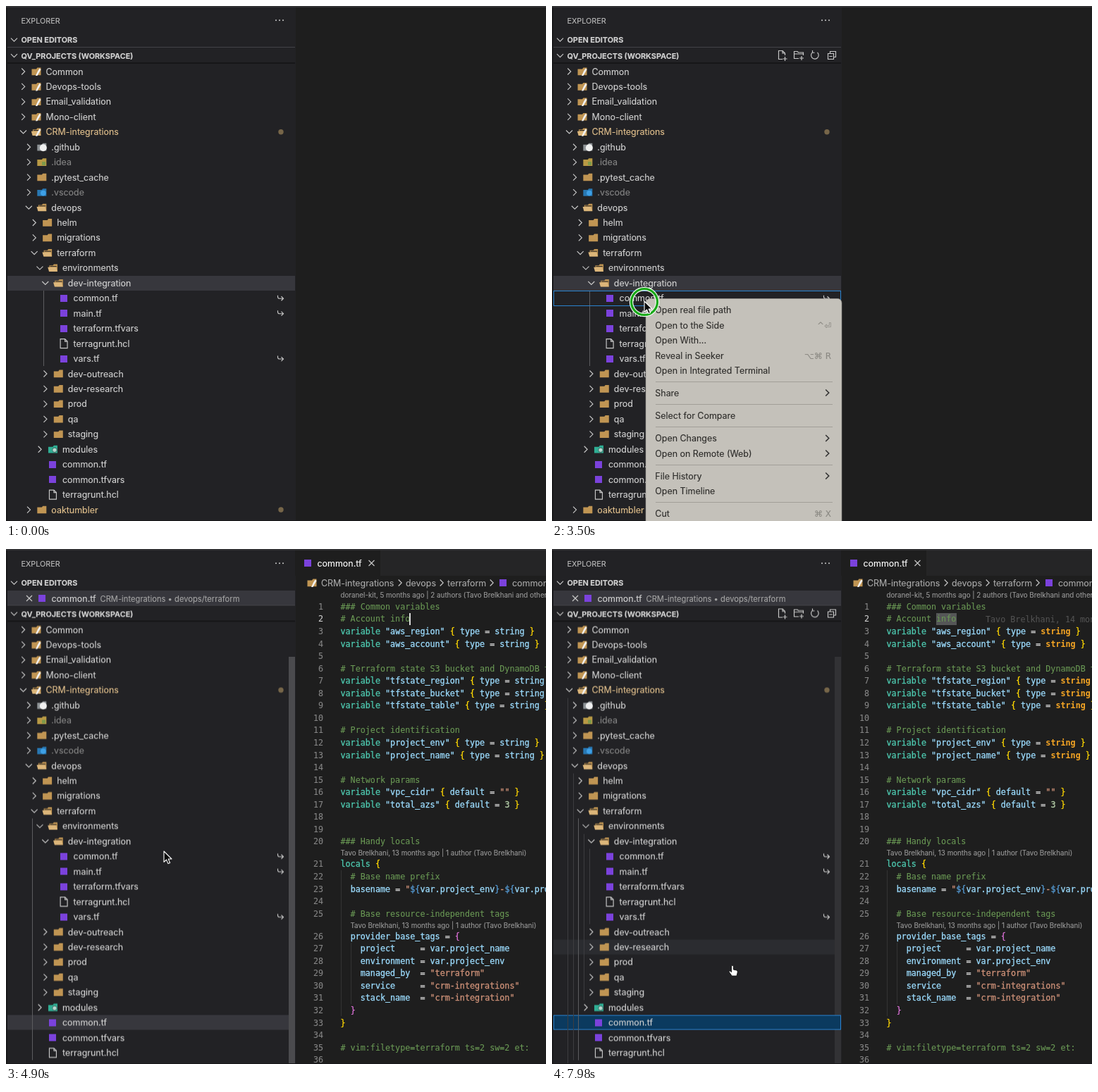
These frames come from a looping animation (766 px wide and 731 px high, 8 s). An HTML page:

```html
<!DOCTYPE html>
<html lang="en">
<head>
<meta charset="utf-8">
<title>Open real file path</title>
<style>
html, body { margin: 0; width: 100%; height: 100%; overflow: hidden; background: #1e1e1e; }
svg { display: block; width: 100%; height: 100%; }
rect { shape-rendering: crispEdges; }
rect[rx] { shape-rendering: auto; }
text {
  font: 12.45px Inter, sans-serif; white-space: pre;
  color: #d2d2d2; fill: currentColor; stroke: currentColor; stroke-width: .12;
}
.head { font-size: 10.85px; font-weight: 700; }
.lens { font-size: 9.8px; color: #999; }
.mono { font: 11.73px "DejaVu Sans Mono", monospace; color: #d4d4d4; stroke-width: .3; }
.num { color: #858585; text-anchor: end; stroke-width: .1; }
.comment { color: #6a9955; stroke-width: .1; }
.kw { color: #4ec9b0; }
.name { color: #9cdcfe; }
.str { color: #ce9178; }
.interp { color: #569cd6; }
.brace { color: #ffd700; }
.inner { color: #da70d6; }
.digit { color: #b5cea8; }
.line { fill: none; stroke: #c8c8c8; stroke-width: 1.15; }
#menu text { color: #2d2c2a; }
#menu .keys { font: 12px "DejaVu Sans", sans-serif; color: #8b8983; text-anchor: end; }
#menu .line { stroke: #333; stroke-width: 1.6; }
#menu #pick text { color: #fff; }
</style>
</head>
<body>
<svg viewBox="0 0 766 731" id="stage"></svg>
<script>
const LOOP = 8000, ROW = 21.45, OPENED = 4760;
const AUTHOR = 'Tavo Brelkhani';
const css = [];

// frames: [ms, declarations]
function animate(selector, timing, frames) {
  const name = 'k' + css.length;
  const body = frames.map(([ms, rule]) => `${ms / LOOP * 100}%{${rule}}`).join('');
  css.push(`@keyframes ${name}{${body}}${selector}{animation:${name} ${LOOP}ms ${timing} infinite}`);
}
function showDuring(selector, ...spans) {
  const frames = [[0, 'opacity:0']];
  for (const [start, end] of spans) {
    frames.push([start, 'opacity:1']);
    if (end < LOOP) frames.push([end, 'opacity:0']);
  }
  animate(selector, 'step-end', frames);
}

const esc = s => s.replace(/&/g, '&amp;').replace(/</g, '&lt;');
const text = (x, y, s, attrs = '') => `<text x="${x}" y="${y + 4.5}" ${attrs}>${esc(s)}</text>`;
const rect = (x, y, w, h, fill, attrs = '') =>
  `<rect x="${x}" y="${y}" width="${w}" height="${h}" fill="${fill}" ${attrs}/>`;
const path = (d, attrs = 'class="line"') => `<path d="${d}" ${attrs}/>`;
const at = (x, y, body, attrs = '') => `<g transform="translate(${x} ${y})" ${attrs}>${body}</g>`;

const right = path('M-2.3-4.5 2.2 0-2.3 4.5');
const down = path('M-4.5-2.3 0 2.2 4.5-2.3');
const cross = path('M-4-4 4 4M4-4-4 4');
const linkArrow = path('M-4-4v2q0 2.5 2.5 2.5H4M1-2.5 4 .5 1 3.5');

const closed = color => path('M-6.5 5.2V-3.6H0l1.4-1.8h5.1V5.2z', `fill="${color}"`);
const opened = path('M-5 5V-3.6H0l1.4-1.8h5.1V5z', 'fill="#c09553"') +
  path('M-7.2-1H4.6L6.5 5.2H-5.4z', 'fill="#dcb67a"') + path('M-4-2.2H5.4', 'stroke="#222225"');
const slash = path('M4.6-4.6 6.6-3 1.4 6-1 6 2-.5z', 'fill="#f2f2f2"');
const square = rect(-5, -5, 10, 10, '#7b42dc');
const icons = {
  root: closed('#c09553') + slash,
  rootOpen: opened + slash,
  folder: closed('#c09553'),
  open: opened,
  git: closed('#8e9396') + '<circle cx="2" cy="1" r="5" fill="#f0f0f0"/>',
  idea: closed('#b99a45') + rect(0, -1, 5, 5, '#7f9a4a'),
  code: closed('#2878b4') + '<circle cx="2" cy="1" r="3.8" fill="#3ea0e6"/>',
  mod: closed('#2fae94') + '<circle cx="2.5" cy="1" r="3.2" fill="#b8d8d0" stroke="#356a60"/>',
  tf: square,
  page: path('M-5-6.5H1.5L5-3V6.5H-5zM1.5-6.5V-3H5'),
};

const entries = `0 root Common
0 root Devops-tools
0 root Email_validation
0 root Mono-client
0 rootOpen CRM-integrations dot
1 git .github
1 idea .idea
1 folder .pytest_cache
1 code .vscode
1 open devops
2 folder helm
2 folder migrations
2 open terraform
3 open environments
4 open dev-integration
5 tf common.tf link
5 tf main.tf link
5 tf terraform.tfvars
5 page terragrunt.hcl
5 tf vars.tf link
4 folder dev-outreach
4 folder dev-research
4 folder prod
4 folder qa
4 folder staging
3 mod modules
3 tf common.tf
3 tf common.tfvars
3 page terragrunt.hcl
1 folder oaktumbler dot
1 folder scripts`.split('\n').map(line => line.split(' '));

const rowTop = i => 82.3 + i * ROW;
const bar = (i, fill, attrs) => rect(2, rowTop(i), 408, ROW, fill, attrs);
const outline = (i, fill, id) =>
  rect(2.5, rowTop(i), 407, ROW - .5, fill, `id="${id}" stroke="#2a83d0"`);
const guide = (depth, first, last, color, attrs = '') =>
  rect(21.8 + depth * 7.82, rowTop(first), 1, (last - first + 1) * ROW, color, attrs);

function treeRow([depth, kind, name, mark], i) {
  const x = 56.5 + depth * 7.82, y = 93 + i * ROW;
  const color = mark === 'dot' ? '#e2c08d' : kind === 'idea' || kind === 'code' ? '#858585' : '#d2d2d2';
  const leaf = kind === 'tf' || kind === 'page';
  const chevron = leaf ? '' : at(x - 32, y, /open/i.test(kind) ? down : right);
  const badge = mark === 'dot' ? `<circle cx="390" cy="${y}" r="3.7" fill="#776649"/>`
    : mark ? at(389.5, y, linkArrow) : '';
  return chevron + at(x - 13.5, y, icons[kind]) + text(x, y, name, `style="color:${color}"`) + badge;
}

function tree() {
  const tools = at(327, 70, path('M0 5.5H-5.5V-6.5H0L3.5-3V0M0-6.5V-3H3.5M3.5 2V8M.5 5H6.5')) +
    at(350, 70, path('M0 4.5H-6.5V-5.5H-2L-.5-4H6.5V0M-6.5-2H6.5M4 1V7M1 4H7')) +
    at(373, 70, path('M3.5-4A5.3 5.3 0 1 1-3-4.6M-3.5-7V-3.8H-.5')) +
    at(397, 70, path('M-2.5-2.5V-5.5H5.5V2.5H2.5M-5.5-2.5H2.5V5.5H-5.5zM-3.7 1.5H.7'));
  const guides = guide(0, 5, 30, '#3d3d40') + guide(1, 10, 28, '#3d3d40') +
    guide(2, 13, 28, '#3d3d40') + guide(3, 14, 24, '#3d3d40') + guide(4, 15, 19, '#3d3d40');
  return `<g id="tree">
    ${rect(2, 58, 408, 1, '#434347')}
    ${at(11.5, 70.5, down)}${text(21.5, 70, 'QV_PROJECTS (WORKSPACE)', 'class="head"')}
    <g id="tools">${tools}</g>
    ${bar(14, '#37373d', 'id="dirRow"')}
    ${bar(26, '#37373d', 'id="fileRow"')}
    ${bar(21, '#2b2c30', 'id="hoverRow"')}
    ${rect(400.5, 132, 9.5, 620, '#4b4b4e', 'id="thumb"')}
    ${rect(400.5, 132, 9.5, 620, '#323235', 'id="thumbDim"')}
    ${outline(26, '#0b3a5f', 'focusRow')}
    <g id="guides">${guides}</g>
    ${guide(4, 15, 19, '#5c5c5f', 'id="dirGuide"')}${guide(2, 13, 28, '#5c5c5f', 'id="fileGuide"')}
    ${entries.map(treeRow).join('')}
    ${outline(15, 'none', 'menuRow')}
    ${rect(2, 80.3, 408, 2, '#161618')}
  </g>`;
}

const source = `### Common variables
# Account info
variable "aws_region" { type = string }
variable "aws_account" { type = string }

# Terraform state S3 bucket and DynamoDB table
variable "tfstate_region" { type = string }
variable "tfstate_bucket" { type = string }
variable "tfstate_table" { type = string }

# Project identification
variable "project_env" { type = string }
variable "project_name" { type = string }

# Network params
variable "vpc_cidr" { default = "" }
variable "total_azs" { default = 3 }


### Handy locals
locals {
  # Base name prefix
  basename = "\${var.project_env}-\${var.project_name}"

  # Base resource-independent tags
  provider_base_tags = {
    project     = var.project_name
    environment = var.project_env
    managed_by  = "terraform"
    service     = "crm-integrations"
    stack_name  = "crm-integration"
  }
}

# vim:filetype=terraform ts=2 sw=2 et:
`.split('\n');

const span = (cls, s) => `<tspan class="${cls}">${s}</tspan>`;
function highlight(line, number) {
  if (/^\s*#/.test(line)) return span('comment', line);
  const braces = number === 26 || number === 32 ? 'inner' : 'brace';
  return line.replace(/"[^"]*"|[{}]|[\w.]+/g, token => {
    if (/^"\w+"/.test(token) && line.startsWith('variable')) return span('name', token);
    if (token[0] === '"') return span('str', token.replace(/\$\{([^}]*)\}/g,
      (_, ref) => span('interp', '${') + span('name', ref) + span('interp', '}')));
    if (/[{}]/.test(token)) return span(braces, token);
    if (/^\d/.test(token)) return span('digit', token);
    if (token === 'string') return span('type', token);
    return span(/^(variable|locals)$/.test(token) ? 'kw' : 'name', token);
  });
}

const lineY = n => 81.6 + (n - 1) * 17.55 + (n > 20 ? 14.5 : 0) + (n > 25 ? 14.5 : 0);

function editor() {
  const code = source.map((line, i) => {
    const n = i + 1, y = lineY(n) + 4.3;
    return `<text class="mono num" x="450" y="${y}" ${n === 2 ? 'style="color:#d0d0d0"' : ''}>${n}</text>` +
      `<text class="mono" x="474.5" y="${y}">${highlight(line, n)}</text>`;
  }).join('');
  const lens = `${AUTHOR}, 13 months ago | 1 author (${AUTHOR})`;
  const dim = 'style="color:#a9a9a9"';
  return `<g id="editor">
    ${rect(410, 2, 356, 35.5, '#252526')}${rect(410, 2, 121, 36, '#1e1e1e')}
    ${at(428, 20, square)}${text(441.5, 20, 'common.tf', 'style="color:#fff"')}${at(518.5, 20, cross)}
    ${at(434, 48, icons.root)}${text(447, 48, 'CRM-integrations', dim)}${at(559, 48, right)}
    ${text(567, 48, 'devops', dim)}${at(618, 48, right)}${text(626, 48, 'terraform', dim)}
    ${at(689, 48, right)}${at(705, 48, square)}${text(718, 48, 'common.tf', dim)}
    ${text(474.5, 64.5, `doranel-kit, 5 months ago | 2 authors (${AUTHOR} and others)`, 'class="lens"')}
    ${text(474.5, 430.5, lens, 'class="lens"')}${text(488.5, 533, lens, 'class="lens"')}
    ${rect(474.5, 456, 1, 207, '#333')}${rect(488.5, 558.5, 1, 87.5, '#333')}
    <g id="blame">${rect(545, 90.5, 28.5, 17.5, '#555657')}
      ${text(615, 99, `${AUTHOR}, 14 months ago`, 'class="mono" style="color:#525252;stroke-width:.1"')}</g>
    ${code}
    ${rect(572.3, 90.5, 1.7, 17.5, '#d8d8d8', 'id="caret"')}
  </g>`;
}

function menu() {
  const items = [[431.5, 'Open real file path'], [453, 'Open to the Side', '^⏎'], [474.5, 'Open With...'],
    [496, 'Reveal in Seeker', '⌥⌘ R'], [517.5, 'Open in Integrated Terminal'], [549, 'Share', '>'],
    [581.5, 'Select for Compare'], [613.5, 'Open Changes', '>'], [635, 'Open on Remote (Web)', '>'],
    [667, 'File History', '>'], [688.5, 'Open Timeline'], [720.5, 'Cut', '⌘ X']];
  const rows = items.map(([y, label, extra]) => text(146.3, y, label) +
    (extra === '>' ? at(390.5, y, right) : extra ? text(396, y, extra, 'class="keys"') : '')).join('');
  const rules = [533, 565, 597.5, 651, 704.5].map(y => rect(146.5, y - .5, 251, 1, '#a19e98')).join('');
  return `<g id="menu">${rect(133, 415.3, 278, 340, '#c4c1ba', 'rx="6" stroke="#8a8883" stroke-width=".6"')}
    ${rules}${rows}
    <g id="pick">${rect(137, 421, 270, 21, '#1f72d2', 'rx="4"')}${text(146.3, 431.5, items[0][1])}</g></g>`;
}

const ring = (id, x, y) => `<g id="${id}" fill="none"><circle cx="${x}" cy="${y}" r="18.5" stroke="#f4fff4"
  stroke-width="5.5"/><circle cx="${x}" cy="${y}" r="18.5" stroke="#18a818" stroke-width="3.2"/></g>`;

const pointer = `<g id="pointer">
  ${path('M0 0V15.3L3.5 12 6 17.6 8.6 16.5 6.2 11H11z',
    'id="arrow" fill="#0a0a0a" stroke="#fff" stroke-width="1.1" stroke-linejoin="round"')}
  ${path('M-1.5 1Q0-1 1.4 1V6L6 7Q7.6 7.6 7.2 10L6 15H-.8L-5 9Q-6 7.5-3.4 8L-1.5 9.6z',
    'id="hand" fill="#fff" stroke="#111" stroke-width=".9" stroke-linejoin="round"')}
</g>`;

document.getElementById('stage').innerHTML = `
  ${rect(0, 0, 766, 731, '#1e1e1e')}${rect(0, 0, 410.5, 731, '#222225')}
  ${text(21.5, 20, 'EXPLORER', 'style="font-size:10.8px;color:#bbb"')}
  ${[383, 388, 393].map(x => `<circle cx="${x}" cy="20.3" r="1" fill="#ccc"/>`).join('')}
  ${at(11.5, 48, down)}${text(21.5, 47.5, 'OPEN EDITORS', 'class="head"')}
  <g id="openItem">${rect(2, 59, 408, ROW, '#37373d')}${at(33, 70, cross)}${at(51, 70, square)}
    ${text(64.5, 70, 'common.tf')}
    ${text(133.5, 70, 'CRM-integrations • devops/terraform', 'style="font-size:11.2px;color:#a2a2a2"')}</g>
  ${tree()}${editor()}
  ${rect(0, 0, 766, 2.3, '#343436')}${rect(0, 2, 1.5, 729, '#18181a')}${rect(0, 729.8, 766, 1.2, '#19191b')}
  ${menu()}
  ${ring('rightClick', 131, 420)}${ring('menuClick', 224, 430)}${ring('fileClick', 121, 675)}
  ${pointer}`;

animate('#tree', 'step-end', [[0, 'transform:none'], [OPENED, `transform:translateY(${ROW}px)`]]);
showDuring('#tools', [70, 210], [3500, OPENED], [6650, 7000], [7840, LOOP]);
showDuring('#dirRow', [0, OPENED]);
showDuring('#dirGuide', [0, OPENED]);
showDuring('#menuRow', [3500, OPENED]);
showDuring('#fileRow', [OPENED, 6650]);
showDuring('#fileGuide', [OPENED, LOOP]);
showDuring('#focusRow', [6650, LOOP]);
showDuring('#hoverRow', [7840, LOOP]);
showDuring('#openItem', [OPENED, LOOP]);
showDuring('#editor', [OPENED, LOOP]);
showDuring('#thumb', [3570, 5110]);
showDuring('#thumbDim', [5110, LOOP]);
showDuring('#blame', [5320, LOOP]);
showDuring('#caret', [4850, 5380], [5910, 6440]);
showDuring('#pick', [3850, OPENED]);
showDuring('#rightClick', [3500, 3640]);
showDuring('#menuClick', [4340, 4480]);
showDuring('#fileClick', [6650, 6790]);
showDuring('#arrow', [280, 7840]);
showDuring('#hand', [7840, LOOP]);
animate('.type', 'step-end', [[0, 'color:#9cdcfe;font-weight:400'],
  [5040, 'color:#f5a524;font-weight:700;stroke-width:0']]);

const fade = pairs => pairs.map(([ms, value]) => [ms, `opacity:${value}`]);
animate('#menu', 'linear', fade([[0, 0], [3499, 0], [3500, 1], [4540, 1], [4600, .82], [4680, .82], [OPENED, 0], [LOOP, 0]]));
animate('#guides', 'linear', fade([[0, 0], [70, 0], [140, .4], [280, 0], [3510, 0], [3640, 1], [4690, 1], [OPENED, 0],
  [6580, 0], [6720, 1], [7000, 1], [7140, 0], [7770, 0], [7910, 1], [LOOP, 1]]));

const route = [[0, 309, 615], [560, 309, 615], [840, 134, 500], [1050, 160, 417], [1330, 160, 417],
  [1890, 100, 650], [2100, 100, 650], [2170, 120, 651], [2450, 120, 651], [2590, 183, 623],
  [2730, 183, 623], [2870, 230, 520], [3010, 131, 409], [3080, 131, 419], [3780, 131, 419],
  [4060, 224, 429], [5320, 224, 429], [5600, 130, 659], [5810, 130, 659], [6020, 121, 675],
  [6800, 121, 675], [7070, 480, 330], [7280, 715, 90], [7420, 620, 45], [7980, 256, 591], [LOOP, 256, 591]];
animate('#pointer', 'linear', route.map(([ms, x, y]) => [ms, `transform:translate(${x}px,${y}px)`]));

document.head.append(Object.assign(document.createElement('style'), { textContent: css.join('\n') }));
</script>
</body>
</html>
```
